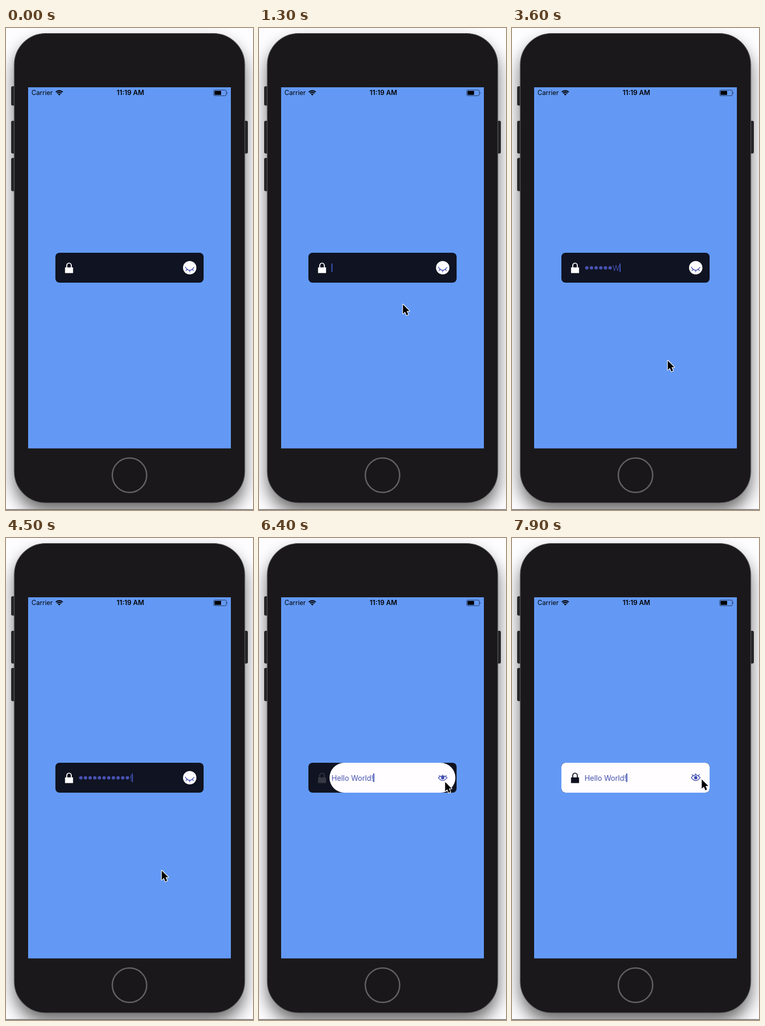
An HTML page that plays this animation: 480 by 935 pixels, repeating every 8000 ms.

```html
<!DOCTYPE html>
<html lang="en">
<head>
<meta charset="utf-8">
<title>Password field</title>
<style>
  html, body { margin: 0; width: 100%; height: 100%; overflow: hidden; background: #fdfcfe; }
  svg { display: block; width: 100vw; height: 100vh; }
  text { font-family: Inter, Roboto, sans-serif; white-space: pre; }
</style>
</head>
<body>
<svg viewBox="0 0 480 935">
  <defs>
    <filter id="blur" x="-20%" y="-20%" width="140%" height="140%"><feGaussianBlur stdDeviation="16"/></filter>
    <filter id="soft" x="-50%" y="-50%" width="200%" height="200%"><feGaussianBlur stdDeviation="1.2"/></filter>
    <clipPath id="fieldClip"><rect x="96" y="436" width="288" height="58" rx="8"/></clipPath>
    <clipPath id="eyeClip"><path id="eyeClipPath"/></clipPath>
    <path id="arrow" d="M.7 1.2V19.2L4.8 15.4L7.7 22.2L11 20.8L8.1 14.1H13.4Z"/>
  </defs>

  <rect width="480" height="935" fill="#fdfcfe"/>
  <rect x="16" y="28" width="448" height="911" rx="62" fill="#000" opacity=".58" filter="url(#blur)"/>
  <rect y="933.5" width="480" height="1.5" fill="#6c6b6d"/>

  <g fill="#252427">
    <rect x="10" y="113" width="10" height="37.5" rx="3"/>
    <rect x="10" y="180" width="10" height="63.5" rx="3"/>
    <rect x="10" y="252" width="10" height="64.5" rx="3"/>
    <rect x="460" y="180" width="10" height="63.5" rx="3"/>
  </g>
  <rect x="16" y="10.5" width="448" height="910.5" rx="61" fill="#1a181a" stroke="#59585b" stroke-width="1.2"/>
  <circle cx="240" cy="867.5" r="33.4" fill="#19171a" stroke="#605f61" stroke-width="2.8"/>
  <rect x="43" y="115" width="394" height="700.5" fill="#6399f5"/>

  <text x="49.6" y="130.3" font-size="12.6">Carrier</text>
  <text x="241.7" y="130.3" font-size="12.9" font-weight="600" text-anchor="middle">11:19 AM</text>
  <g transform="translate(103.5 131)" fill="none" stroke="#000" stroke-width="2.2">
    <path d="M-6.7 -6.7A9.5 9.5 0 0 1 6.7 -6.7M-4.3 -4.3A6.1 6.1 0 0 1 4.3 -4.3"/>
    <path d="M0 0L-2.5 -2.5A3.5 3.5 0 0 1 2.5 -2.5Z" fill="#000" stroke="none"/>
  </g>
  <rect x="403.6" y="120.4" width="24.6" height="11" rx="2.4" fill="none" stroke="#1c2a47" stroke-width=".9"/>
  <rect x="405.2" y="122" width="12.8" height="7.8" rx=".8"/>
  <path d="M429.5 124.2A2.2 2.2 0 0 1 429.5 127.8Z" fill="#1c2a47"/>

  <rect x="96" y="436" width="288" height="58" rx="8" fill="#101321"/>
  <g clip-path="url(#fieldClip)"><rect id="cover" fill="#fffdff"/></g>

  <g id="lock">
    <rect x="114.7" y="464.4" width="15.6" height="11"/>
    <path d="M118.1 465V460.5A4.4 4.4 0 0 1 126.9 460.5V465" fill="none" stroke-width="1.9"/>
  </g>

  <g id="bullets" fill="#4852b2"></g>
  <text id="entry" y="470.6" font-size="14.1" fill="#434fab"></text>
  <rect id="caret" y="456.8" width="2.2" height="16.6" fill="#3c52b4"/>

  <g fill="none" stroke="#3f4bae" stroke-width="1.3" stroke-linecap="round">
    <g clip-path="url(#eyeClip)"><circle cx="357" cy="465" r="3.2" fill="#3f4bae" stroke="none"/></g>
    <path id="eye"/>
    <path id="lashes"/>
  </g>

  <g id="cursor">
    <use href="#arrow" y="1.4" opacity=".35" filter="url(#soft)"/>
    <use href="#arrow" stroke="#fff" stroke-width="2.4" stroke-linejoin="round"/>
    <use href="#arrow"/>
  </g>
</svg>

<script>
const LOOP = 8000, STEP = 100;
const PHRASE = "Hello World!";
const KEY_TIMES = [2300, 2600, 2800, 2900, 3100, 3300, 3600, 3800, 3900, 4000, 4200, 4400];
const FOCUS = 1000, REVEAL = 6115, REVEAL_LENGTH = 400;
const TEXT_X = 141, BULLET_STEP = 9.05;
const BLINK = 860, BLINK_ON = 500;

// time, x, y of the pointer tip
const POINTER = [
  [100, 461, 330], [400, 370, 420], [700, 264, 462], [1000, 264, 466],
  [1300, 279, 535], [1700, 302, 644], [5300, 302, 644], [5600, 367, 488],
  [5900, 361, 472], [6700, 361, 472], [7300, 368, 467], [8000, 368, 467]
];

const el = id => document.getElementById(id);
const set = (id, attrs) => {
  for (const name in attrs) el(id).setAttribute(name, attrs[name]);
};
const lerp = (a, b, p) => a + (b - a) * p;
const clamp = p => Math.min(1, Math.max(0, p));
const easeInOut = p => p < .5 ? 2 * p * p : 1 - 2 * (1 - p) ** 2;

const bullets = [...PHRASE].map((_, i) => {
  const dot = document.createElementNS("http://www.w3.org/2000/svg", "circle");
  dot.setAttribute("cx", 145.4 + i * BULLET_STEP);
  dot.setAttribute("cy", 465.2);
  dot.setAttribute("r", 3.3);
  return el("bullets").appendChild(dot);
});

function drawCover(p) {
  const x = lerp(344, 96, p), right = lerp(370, 384, p);
  const grow = clamp(p * 1.25);
  const y = lerp(452, 436, grow), height = lerp(26, 58, grow);
  const rx = lerp(height / 2, 8, clamp((p - .86) / .14));
  set("cover", { x, y, width: right - x, height, rx });
}

function drawEye(p) {
  const left = 348.4, right = 365.6, corner = lerp(463.8, 465, p);
  const lid = lerp(476.5, 454.5, p);
  const shape = `M${left} ${corner}Q357 ${lid} ${right} ${corner}Q357 476 ${left} ${corner}`;
  set("eye", { d: shape });
  set("eyeClipPath", { d: shape });
  const lash = (s, dx) => {
    const bend = 2 * s * (1 - s);
    const x = lerp(left, right, s), y = lerp(corner, lid, bend);
    return `M${x} ${y}l${dx} ${lerp(3, -3, p)}`;
  };
  set("lashes", { d: lash(.2, -1.9) + lash(.5, 0) + lash(.8, 1.9) });
}

function drawLock(p) {
  const color = `rgb(${lerp(255, 14, p)},${lerp(255, 16, p)},${lerp(255, 30, p)})`;
  set("lock", { fill: color, stroke: color, "stroke-width": 0 });
}

function drawEntry(t) {
  const open = t >= REVEAL;
  const typed = KEY_TIMES.filter(k => k <= t).length;
  const hidden = open ? 0 : Math.max(0, typed - 1);
  bullets.forEach((dot, i) => dot.setAttribute("visibility", i < hidden ? "visible" : "hidden"));

  const entry = el("entry"), x = TEXT_X + hidden * BULLET_STEP;
  entry.textContent = PHRASE.slice(hidden, typed);
  entry.setAttribute("x", x);

  const width = typed ? entry.getComputedTextLength() : 0;
  const lastAction = open ? REVEAL : typed ? KEY_TIMES[typed - 1] : FOCUS;
  const lit = t >= FOCUS && (t - lastAction) % BLINK < BLINK_ON;
  set("caret", { x: x + width - .3, visibility: lit ? "visible" : "hidden" });
}

function drawPointer(t) {
  const shown = t >= POINTER[0][0];
  set("cursor", { visibility: shown ? "visible" : "hidden" });
  if (!shown) return;
  const next = POINTER.findIndex(point => point[0] > t);
  const [t0, x0, y0] = POINTER[next - 1], [t1, x1, y1] = POINTER[next];
  const p = easeInOut((t - t0) / (t1 - t0));
  set("cursor", { transform: `translate(${lerp(x0, x1, p)} ${lerp(y0, y1, p)})` });
}

function draw(now) {
  const t = Math.floor(now % LOOP / STEP) * STEP;
  const p = easeInOut(clamp((t - REVEAL) / REVEAL_LENGTH));
  drawCover(p);
  drawLock(p);
  drawEye(p);
  drawEntry(t);
  drawPointer(t);
}

const start = performance.now();
function tick() {
  draw(performance.now() - start);
  requestAnimationFrame(tick);
}
tick();
</script>
</body>
</html>
```
